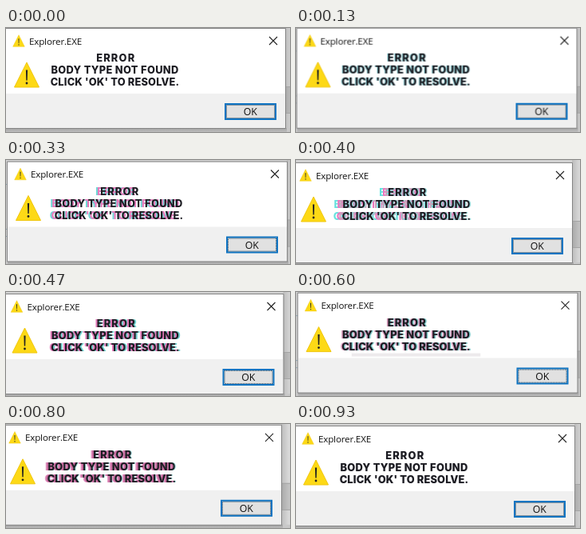
Recreate the animation shown at these times as an HTML page. Size 356x130 px, loop 990 ms.

```html
<!DOCTYPE html>
<html lang="en">
<head>
<meta charset="utf-8">
<title>Error dialog</title>
<style>
html, body { margin: 0; width: 100%; height: 100%; overflow: hidden; background: #cdcdcd; }
#stage { position: relative; width: 356px; height: 130px; overflow: hidden; }
#scene { position: absolute; inset: 0; animation: shake 990ms step-end infinite; }
svg { position: absolute; left: 0; top: 0; overflow: visible; }
.ui { font-family: "Open Sans", sans-serif; font-size: 11.6px; letter-spacing: -.17px; fill: #111; }
.ok { font-size: 12.3px; letter-spacing: 0; }

#msg {
  position: absolute; left: 36.5px; top: 30px; width: 200px; height: 46px;
  font: 800 12.8px/15px Inter, sans-serif; color: #1c1c22;
  text-align: center; white-space: nowrap;
  animation: glitch 990ms step-end infinite;
}
#msg div { height: 15px; letter-spacing: .37px; }
#msg .head { letter-spacing: 1.2px; padding-left: 1.5px; animation: slice 990ms step-end infinite; }
#msg .ask { letter-spacing: .2px; }
#msg::after {
  content: ""; position: absolute; left: 16px; width: 170px; top: 0; height: 4px;
  background: #e9e5e8; opacity: 0; animation: streak 990ms step-end infinite;
}

@keyframes shake {
  0%     { transform: none; }
  7.07%  { transform: translate(.5px, 0); }
  13.13% { transform: translate(1.5px, -.3px); }
  20.2%  { transform: translate(5px, 0); }
  27.27% { transform: translate(8.5px, 0); }
  33.33% { transform: translate(2px, 1.5px); }
  40.4%  { transform: translate(-4px, 3px); }
  47.47% { transform: translate(-2.5px, 2px); }
  53.54% { transform: translate(0, 1px); }
  60.61% { transform: translate(2.5px, .6px); }
  67.68% { transform: translate(1px, .6px); }
  73.74% { transform: translate(-2px, .8px); }
  80.81% { transform: translate(-5px, .8px); }
  87.88% { transform: translate(-3px, 1.5px); }
  93.94% { transform: translate(-1px, 2px); }
}
@keyframes glitch {
  0%     { transform: none; text-shadow: none; }
  13.13% { text-shadow: -1px 0 #7fc9cf, 1px 0 1px #c9dfe2; transform: none; }
  20.2%  { text-shadow: -1px 0 #e45aa8, 1.5px 0 #58cfd0; transform: none; }
  27.27% { text-shadow: -2px 0 #e345a4, 2px 0 #45cdcb; transform: none; }
  33.33% { text-shadow: -4px 0 #e77bbb, -6px 0 #6fd8d6; transform: translateX(3px); }
  40.4%  { text-shadow: 1.5px 0 #9bdcdc, -4px 0 #c9a3bd, -7px 0 #ec78be, -11px 0 #66e2de; transform: translateX(6px); }
  47.47% { text-shadow: -2px 0 #e277b7, 2px 0 #6cd0ce; transform: translateX(3px); }
  53.54% { text-shadow: -1px 0 #d997bd, 1px 0 #83cdcd; transform: none; }
  60.61% { text-shadow: -1.5px 0 1px #d58fb5, 1.5px 0 1px #69bfc0; transform: translateX(-1px); }
  67.68% { text-shadow: -1px 0 #d58fb5, 1px 0 #69bfc0; transform: none; }
  73.74% { text-shadow: -2px 0 #dd78b2, 1px 0 #69bfc0; transform: none; }
  80.81% { text-shadow: -2px 0 #c6699d, -3.5px 0 #e59ac6, 1px 0 #8dcfce; transform: translateX(1px); }
  87.88% { text-shadow: -1px 0 #dba9c4, 1px 0 #b2d8d8; transform: none; }
  93.94% { text-shadow: 0 0 1px #a9a9b2; transform: none; }
}
@keyframes slice {
  0%     { transform: none; clip-path: none; }
  27.27% { transform: translate(2px, -2px) scaleY(.9); clip-path: inset(5px -20px 0); }
  33.33% { transform: none; clip-path: none; }
}
@keyframes streak {
  0%     { opacity: 0; transform: none; }
  27.27% { opacity: .8; transform: translateY(2px); }
  33.33% { opacity: 0; transform: none; }
  60.61% { opacity: .8; transform: translate(11px, 46px) scaleX(.95); }
  67.68% { opacity: 0; transform: none; }
}
</style>
</head>
<body>
<div id="stage">
  <div id="scene">
    <svg width="356" height="130" viewBox="0 0 356 130">
      <defs>
        <linearGradient id="fall" x2="0" y2="1">
          <stop offset="0" stop-color="#a2a2a2"/>
          <stop offset="1" stop-color="#c8c8c8"/>
        </linearGradient>
        <linearGradient id="side" x2=".25">
          <stop offset="0" stop-color="#bcbcbc"/>
          <stop offset="1" stop-color="#dadada"/>
        </linearGradient>
        <symbol id="warn" viewBox="0 0 34 34" overflow="visible">
          <path d="M17 1.5 32.5 32.5H1.5Z" fill="#fdd916" stroke="#f0c60c" stroke-linejoin="round"/>
          <path d="M15.9 11h2.2l-.4 13h-1.4Z" fill="#222"/>
          <circle cx="17" cy="27.5" r="1.4" fill="#222"/>
        </symbol>
      </defs>

      <!-- desktop behind the dialog -->
      <path d="M-20-20H390V150H-20Z" fill="#d2d2d2"/>
      <path d="M350-20H390V150H350Z" fill="url(#side)"/>
      <path d="M350 73H390V107H350Z" fill="#000" opacity=".1"/>
      <path d="M350 73.5H390M350 106.5H390" stroke="#a4a4a4"/>
      <path d="M-20 29H0M-20 85H0M-20 94H0" stroke="#8fa9b8"/>
      <path d="M-20 125H390V150H-20Z" fill="#c8c8c8"/>
      <path d="M0 125H352V132H0Z" fill="url(#fall)"/>

      <!-- dialog -->
      <path d="M0 1H350V125H0Z" fill="#fff"/>
      <path d="M0 82H350V125H0Z" fill="#f0f0f0"/>
      <path d="M-.5 .5H350.5V125.5H-.5Z" fill="none" stroke="#858585"/>
      <use href="#warn" x="8" y="8" width="16" height="16"/>
      <use href="#warn" x="9" y="41.5" width="34" height="34"/>
      <text class="ui" x="29" y="20.5">Explorer.EXE</text>
      <path d="M330 11 340 21M340 11 330 21" stroke="#222" stroke-width="1.1"/>
      <path d="M275 95H338V114H275Z" fill="#e1e1e1" stroke="#0f74c2" stroke-width="2"/>
      <path d="M276.5 96.5H336.5V112.5H276.5Z" fill="none" stroke="#24425a" stroke-dasharray="1 1"/>
      <text class="ui ok" x="306.2" y="109" text-anchor="middle">OK</text>
    </svg>
    <div id="msg">
      <div class="head">ERROR</div>
      <div>BODY TYPE NOT FOUND</div>
      <div class="ask">CLICK 'OK' TO RESOLVE.</div>
    </div>
  </div>
</div>
</body>
</html>
```
